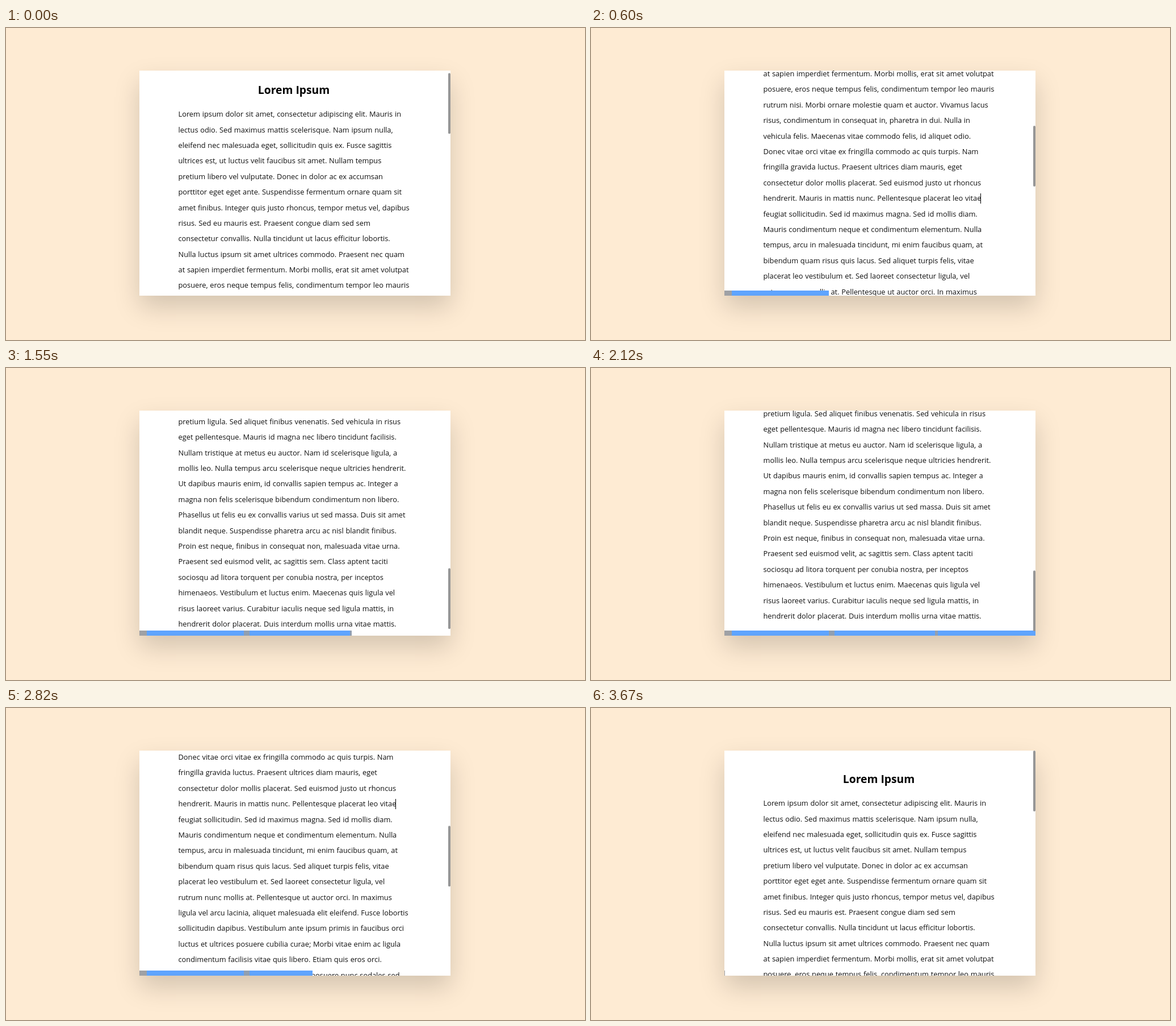
Write an HTML page that moves like this. It is 1020 by 549 pixels and loops after 3700 ms.

```html
<!DOCTYPE html>
<html lang="la">
<head>
<meta charset="utf-8">
<title>Scroll progress</title>
<style>
  html, body { margin: 0; width: 100%; height: 100%; overflow: hidden; }
  body { background: #feebd3; color: #111; font-family: "Open Sans", "Noto Sans", sans-serif; }
  .card {
    position: absolute; left: 235px; top: 75px; width: 548px; height: 396px;
    background: #fff; box-shadow: 0 20px 42px rgba(0, 0, 0, .17);
  }
  .view { position: absolute; inset: 0; overflow: hidden; }
  #page { position: absolute; left: 0; top: 0; width: 544px; }
  h1 {
    position: absolute; top: 35.5px; width: 100%; margin: 0;
    font-size: 19.3px; line-height: 28px; text-align: center; color: #000;
  }
  pre {
    position: absolute; left: 68.5px; top: 79.2px; margin: 0;
    font: 12.82px/27.39px "Open Sans", "Noto Sans", sans-serif; word-spacing: .4px;
  }
  .caret { position: absolute; left: 451px; top: 577px; width: 1px; height: 18px; background: #000; }
  #thumb { position: absolute; right: 0; top: 0; width: 4px; height: 107px; border-radius: 2px; background: #969696; }
  #bar {
    position: absolute; left: 0; bottom: 0; height: 9px;
    background: linear-gradient(90deg,
      #9fa1a5 13px, #5fa4fe 13px 184px, #8f9fb2 184px 194px,
      #5fa4fe 194px 371px, #929fb0 371px 376px, #5fa4fe 376px);
  }
</style>
</head>
<body>
<div class="card"><div class="view">
<div id="page">
<h1>Lorem Ipsum</h1>
<pre>Lorem ipsum dolor sit amet, consectetur adipiscing elit. Mauris in
lectus odio. Sed maximus mattis scelerisque. Nam ipsum nulla,
eleifend nec malesuada eget, sollicitudin quis ex. Fusce sagittis
ultrices est, ut luctus velit faucibus sit amet. Nullam tempus
pretium libero vel vulputate. Donec in dolor ac ex accumsan
porttitor eget eget ante. Suspendisse fermentum ornare quam sit
amet finibus. Integer quis justo rhoncus, tempor metus vel, dapibus
risus. Sed eu mauris est. Praesent congue diam sed sem
consectetur convallis. Nulla tincidunt ut lacus efficitur lobortis.
Nulla luctus ipsum sit amet ultrices commodo. Praesent nec quam
at sapien imperdiet fermentum. Morbi mollis, erat sit amet volutpat
posuere, eros neque tempus felis, condimentum tempor leo mauris
rutrum nisi. Morbi ornare molestie quam et auctor. Vivamus lacus
risus, condimentum in consequat in, pharetra in dui. Nulla in
vehicula felis. Maecenas vitae commodo felis, id aliquet odio.
Donec vitae orci vitae ex fringilla commodo ac quis turpis. Nam
fringilla gravida luctus. Praesent ultrices diam mauris, eget
consectetur dolor mollis placerat. Sed euismod justo ut rhoncus
hendrerit. Mauris in mattis nunc. Pellentesque placerat leo vitae
feugiat sollicitudin. Sed id maximus magna. Sed id mollis diam.
Mauris condimentum neque et condimentum elementum. Nulla
tempus, arcu in malesuada tincidunt, mi enim faucibus quam, at
bibendum quam risus quis lacus. Sed aliquet turpis felis, vitae
placerat leo vestibulum et. Sed laoreet consectetur ligula, vel
rutrum nunc mollis at. Pellentesque ut auctor orci. In maximus
ligula vel arcu lacinia, aliquet malesuada elit eleifend. Fusce lobortis
sollicitudin dapibus. Vestibulum ante ipsum primis in faucibus orci
luctus et ultrices posuere cubilia curae; Morbi vitae enim ac ligula
condimentum facilisis vitae quis libero. Etiam quis eros orci.
Suspendisse commodo velit lorem, vel posuere nunc sodales sed.
Aenean porttitor, nulla nec hendrerit facilisis, ex magna lobortis
lorem, id convallis dui enim ac enim. Cras lacinia ullamcorper velit a
iaculis. Mauris aliquam augue ac molestie vehicula. Etiam a luctus
sem. Mauris feugiat neque at justo consectetur sollicitudin laoreet
gravida dolor. Mauris at massa at tortor facilisis venenatis in
pretium ligula. Sed aliquet finibus venenatis. Sed vehicula in risus
eget pellentesque. Mauris id magna nec libero tincidunt facilisis.
Nullam tristique at metus eu auctor. Nam id scelerisque ligula, a
mollis leo. Nulla tempus arcu scelerisque neque ultricies hendrerit.
Ut dapibus mauris enim, id convallis sapien tempus ac. Integer a
magna non felis scelerisque bibendum condimentum non libero.
Phasellus ut felis eu ex convallis varius ut sed massa. Duis sit amet
blandit neque. Suspendisse pharetra arcu ac nisl blandit finibus.
Proin est neque, finibus in consequat non, malesuada vitae urna.
Praesent sed euismod velit, ac sagittis sem. Class aptent taciti
sociosqu ad litora torquent per conubia nostra, per inceptos
himenaeos. Vestibulum et luctus enim. Maecenas quis ligula vel
risus laoreet varius. Curabitur iaculis neque sed ligula mattis, in
hendrerit dolor placerat. Duis interdum mollis urna vitae mattis.</pre>
<div class="caret"></div>
</div>
<div id="bar"></div>
<div id="thumb"></div>
</div></div>
<script>
const LOOP = 3700, VIEW = 396, CONTENT = 1473;
const [page, bar, thumb] = ["page", "bar", "thumb"].map(id => document.getElementById(id));

// Cubic Bezier timing function, solved by bisection.
function bezier(x1, y1, x2, y2) {
  const at = (a, b, u) => 3 * a * u * (1 - u) ** 2 + 3 * b * u * u * (1 - u) + u ** 3;
  return x => {
    let lo = 0, hi = 1;
    for (let i = 0; i < 20; i++) {
      const mid = (lo + hi) / 2;
      if (at(x1, x2, mid) < x) lo = mid; else hi = mid;
    }
    return at(y1, y2, lo);
  };
}
const easeInOut = bezier(.42, 0, .58, 1);
const ease = bezier(.25, .1, .25, 1);
const easeIn = x => x * x;

// Each key is [time, value, easing towards it]; without easing the value is held or jumps.
const scrollKeys = [
  [-47, 0], [280, 361, easeInOut],
  [795, 361], [1045, 728.5, easeInOut],
  [1390, 728.5], [1605, 1077, easeInOut],
  [2085, 1077], [2285, 604, easeInOut],
  [2715, 604], [2900, 425, easeInOut],
  [3100, 425], [3300, 0, easeInOut]
];

// The bar creeps while scrolling goes on and catches up afterwards.
const barKeys = [
  [0, 0], [310, 13, easeIn], [610, 184, ease],
  [810, 184], [1060, 195, easeIn], [1345, 371, ease],
  [1400, 371], [1590, 376, easeIn], [1880, 548, ease],
  [2100, 548], [2280, 533, easeIn], [2580, 307, ease],
  [2740, 307], [2900, 301, easeIn], [3130, 216, ease],
  [3140, 216], [3310, 201, easeIn], [3670, 1, ease]
];

function valueAt(keys, time) {
  const next = keys.findIndex(key => key[0] > time);
  if (next < 0) return keys[keys.length - 1][1];
  const [t0, from] = keys[next - 1];
  const [t1, to, easing] = keys[next];
  return easing ? from + (to - from) * easing((time - t0) / (t1 - t0)) : from;
}

function draw(now) {
  const time = now % LOOP;
  const scroll = valueAt(scrollKeys, time);
  page.style.transform = `translateY(${-Math.round(scroll)}px)`;
  thumb.style.transform = `translateY(${scroll * VIEW / CONTENT}px)`;
  bar.style.width = valueAt(barKeys, time) + "px";
}

const start = performance.now();
function tick() {
  draw(performance.now() - start);
  requestAnimationFrame(tick);
}
tick();
</script>
</body>
</html>
```
